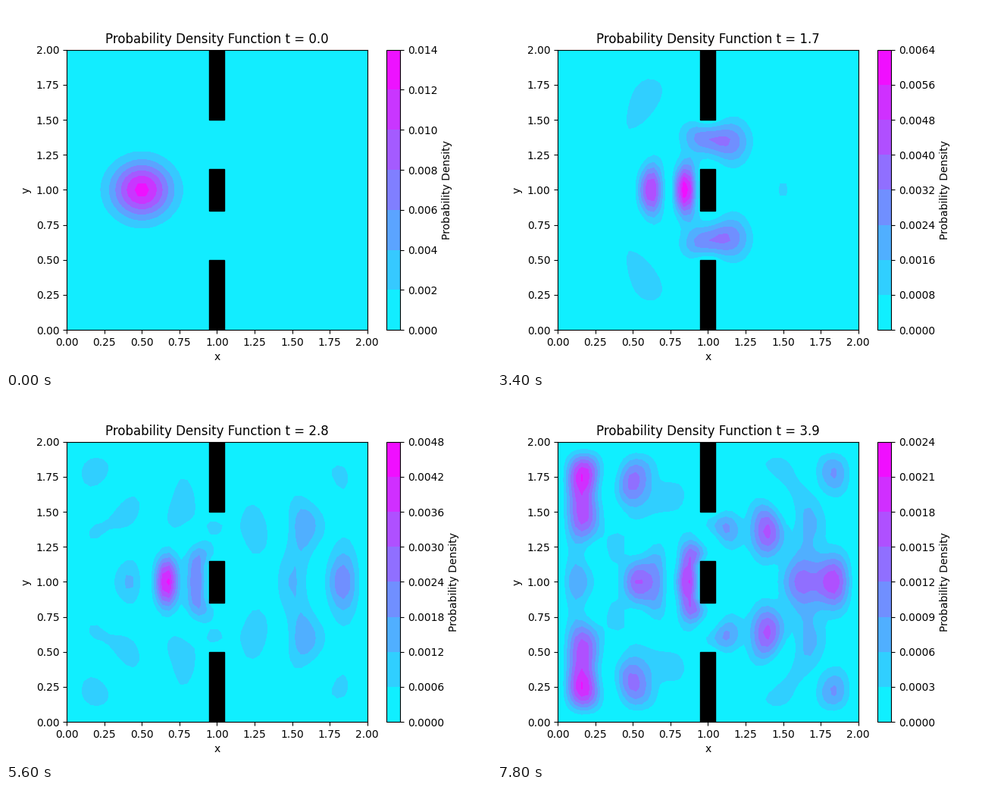
Animation of 640x480 px, one loop 8000 ms. Source, as a matplotlib script:

```python
import numpy as np
import matplotlib.pyplot as plt
from matplotlib.animation import FuncAnimation
from matplotlib.patches import Rectangle

SIZE = 2.0        # box side
N = 51            # grid points per side
MID = N // 2
SIGMA = 0.2       # packet width
K0 = 10.0         # packet wave number
X0, Y0 = 0.5, 1.0
DT = 0.1
FRAMES = 40

axis = np.linspace(0, SIZE, N)
step = axis[1] - axis[0]
WALLS = [(0.0, 0.5), (0.85, 1.15), (1.5, 2.0)]


def second_diff(n):
    return -2 * np.eye(n) + np.eye(n, k=1) + np.eye(n, k=-1)


def solve():
    """Crank-Nicolson evolution on the upper half (the setup is even in y)."""
    x, y = axis[1:-1], axis[MID:-1]
    dx2, dy2 = second_diff(len(x)), second_diff(len(y))
    dy2[0, 1] = 2
    lap = (np.kron(dy2, np.eye(len(x))) + np.kron(np.eye(len(y)), dx2)) / step**2

    gx, gy = np.meshgrid(x, y)
    in_wall = np.zeros(gx.shape, bool)
    for low, high in WALLS:
        in_wall |= (abs(gx - 1) < 0.05) & (gy > low) & (gy < high)
    free = np.flatnonzero(~in_wall)

    ham = -lap[np.ix_(free, free)]
    eye = np.eye(len(free))
    cayley = 2 * np.linalg.inv(eye + 0.5j * DT * ham) - eye

    psi = np.exp(-((gx - X0)**2 + (gy - Y0)**2) / (2 * SIGMA**2) + 1j * K0 * gx)
    psi = psi.ravel()[free]

    result = []
    for _ in range(FRAMES):
        half = np.zeros(gx.size)
        half[free] = abs(psi)**2
        full = np.zeros((N, N))
        full[MID:-1, 1:-1] = half.reshape(gx.shape)
        full[1:MID] = full[:MID:-1][:-1]
        full[1:MID] = full[N - 2:MID:-1]
        result.append(full)
        psi = cayley @ psi
    return np.array(result) / result[0].sum()


density = solve()
fig = plt.figure(figsize=(6.4, 4.8), dpi=100)


def draw(i):
    fig.clf()
    ax = fig.add_subplot()
    filled = ax.contourf(axis, axis, density[i], cmap="cool")
    fig.colorbar(filled, ax=ax, label="Probability Density")
    for low, high in WALLS:
        ax.add_patch(Rectangle((0.95, low), 0.1, high - low, color="black"))
    ax.set(xlim=(0, SIZE), ylim=(0, SIZE), xlabel="x", ylabel="y",
           title=f"Probability Density Function t = {i * DT:.1f}")
    return []


anim = FuncAnimation(fig, draw, frames=FRAMES, init_func=lambda: [],
                     interval=200, repeat=True, repeat_delay=0, blit=False)
plt.show()
```
